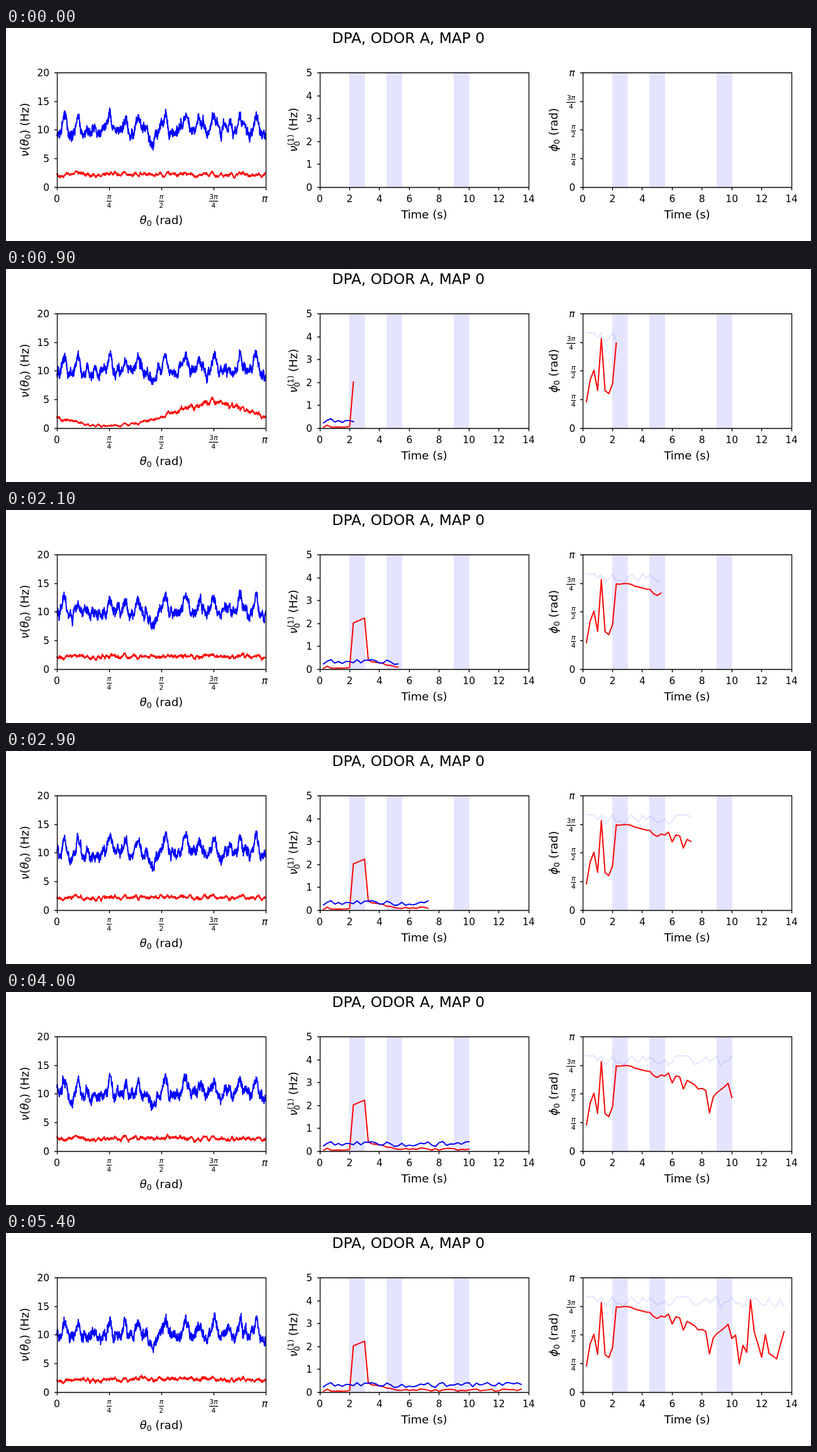
These frames come from a looping animation (1280x340 px, 5.5 s). An HTML page:

```html
<!DOCTYPE html>
<html lang="en">
<head>
<meta charset="utf-8">
<title>Tuning curves</title>
<style>
  html, body { margin: 0; width: 100%; height: 100%; overflow: hidden; background: #fff; }
  svg { display: block; font-family: "DejaVu Sans", sans-serif; }
  text { text-anchor: middle; font-size: 15.4px; }
  .title { font-size: 23.3px; }
  .label { font-size: 18px; }
  .small { font-size: 12.6px; }
  .frac { font-size: 10.8px; }
  .it { font-style: italic; }
  .end { text-anchor: end; }
  .line { fill: none; stroke-width: 1.95; stroke-linejoin: round; stroke-linecap: square; }
  .axis { fill: none; stroke: #000; stroke-width: 1.3; }
  .band { fill: #00f; stroke: #00f; stroke-width: 1.2; opacity: .1; }
</style>
</head>
<body>
<svg id="stage" width="1280" height="340"></svg>
<script>
const TOP = 71.5, BOTTOM = 254, WIDTH = 332, HEIGHT = BOTTOM - TOP;
const STEP_MS = 100, STEPS = 55, DT = 0.25, DURATION = 14, CELLS = 1000;
const LEFT = { tuning: 81, rate: 499, phase: 917 };

// Seeded uniform noise in -1..1
function random(seed) {
  let a = seed * 7919 + 17;
  return () => {
    a = a + 0x6D2B79F5 | 0;
    let t = Math.imul(a ^ a >>> 15, 1 | a);
    t = t + Math.imul(t ^ t >>> 7, 61 | t) ^ t;
    return ((t ^ t >>> 14) >>> 0) / 2147483648 - 1;
  };
}

// Moving average of white noise, scaled to unit deviation
function smoothNoise(seed, span) {
  const white = Array.from({ length: CELLS + span }, random(seed));
  let sum = 0;
  for (let i = 0; i < span; i++) sum += white[i];
  return Array.from({ length: CELLS }, (_, i) => {
    sum += white[i + span] - white[i];
    return sum * Math.sqrt(3 / span);
  });
}

function interpolate(keys, x) {
  const i = Math.max(1, keys.findIndex(k => k[0] >= x));
  const [x0, y0] = keys[i - 1], [x1, y1] = keys[i];
  return y0 + (y1 - y0) * (x - x0) / (x1 - x0);
}

// Turning points of the red phase: [step, degrees]
const phaseKeys = [[1, 41], [2, 75], [3, 92], [4, 59], [5, 142], [6, 59], [7, 54], [8, 70], [9, 134], [12, 134],
  [18, 125], [33, 96], [34, 61], [35, 86], [39, 107], [40, 84], [41, 90], [42, 45], [43, 74], [44, 62],
  [45, 146], [46, 95], [48, 55], [49, 90], [50, 60], [52, 53], [54, 95]];

// A trace has one value per step, starting at step 1
const trace = (seed, rule) => {
  const noise = random(seed);
  return Array.from({ length: STEPS - 1 }, (_, i) => rule(i + 1, noise()));
};
const rateRed = trace(1, (n, noise) =>
  n >= 9 && n <= 12 ? 2.02 + .07 * (n - 9) : .085 + .05 * noise + (n > 12 ? .34 * Math.exp((13 - n) / 4) : 0));
const rateBlue = trace(2, (n, noise) => .31 + .11 * noise);
const phaseRed = trace(3, (n, noise) => interpolate(phaseKeys, n) + (n > 18 && n < 33 ? 10 : 1) * noise);
const phaseBlue = trace(4, (n, noise) => 142 + 9 * noise);

const stage = document.getElementById("stage");
const text = (x, y, s, cls = "", more = "") => `<text x="${x}" y="${y}" class="${cls}" ${more}>${s}</text>`;
const path = d => `<path class="axis" d="${d}"/>`;
const sub = (s, after) => `<tspan class="small" dy="3">${s}</tspan><tspan dy="-3">${after}</tspan>`;
const it = s => `<tspan class="it">${s}</tspan>`;
const vertical = (x, s, y = 162.5, cls = "label") =>
  text(0, 0, s, cls, `transform="translate(${x} ${y}) rotate(-90)"`);

function fraction(x, y, num, den) {
  const half = num.length * 3.4 + .4;
  return text(x, y - 3.3, num.replace("π", it("π")), "frac") + text(x, y + 10, den, "frac") +
    path(`M${x - half} ${y}h${half * 2}`);
}

// Spines and ticks sit on whole pixels
function frame(left, xTicks, yTicks) {
  const snap = v => Math.floor(v) + .5, bottom = snap(BOTTOM);
  let d = `M${snap(left)} ${snap(TOP)}h${WIDTH}V${bottom}h${-WIDTH}z`;
  for (let i = 0; i <= xTicks; i++) d += `M${snap(left + WIDTH * i / xTicks)} ${bottom}v4.5`;
  for (let i = 0; i <= yTicks; i++) d += `M${snap(left)} ${snap(BOTTOM - HEIGHT * i / yTicks)}h-4.5`;
  return path(d);
}

function build() {
  const { tuning, rate, phase } = LEFT;
  let under = "", over = text(639.7, 24, "DPA, ODOR A, MAP 0", "title");
  for (const left of [rate, phase]) {
    for (const [from, to] of [[2, 3], [4.5, 5.5], [9, 10]]) {
      const x = left + WIDTH * from / DURATION, w = WIDTH * (to - from) / DURATION;
      under += `<rect class="band" x="${x}" y="${TOP}" width="${w}" height="${HEIGHT}"/>`;
    }
    for (let s = 0; s <= DURATION; s += 2) over += text(left + WIDTH * s / DURATION, 277.5, s);
    over += text(left + WIDTH / 2, 303.5, "Time (s)", "label");
  }
  for (const [left, max, step] of [[tuning, 20, 5], [rate, 5, 1]])
    for (let v = 0; v <= max; v += step)
      over += text(left - 12, BOTTOM - HEIGHT * v / max + 5.7, v, "end");
  over += text(tuning, 277.5, "0") + text(phase - 16.5, 259.7, "0");
  over += text(411.5, 277.5, "π", "it") + text(phase - 17, 77, "π", "it");
  [["π", "4"], ["π", "2"], ["3π", "4"]].forEach(([num, den], i) => {
    const k = (i + 1) / 4;
    over += fraction(tuning + WIDTH * k, 276.5, num, den);
    over += fraction(phase - 11 - num.length * 3.8, BOTTOM - HEIGHT * k + 1.5, num, den);
  });
  over += text(247, 313, it("θ") + sub(0, " (rad)"), "label");
  over += vertical(36, it("ν") + "(" + it("θ") + sub(0, ") (Hz)"));
  over += vertical(463, it("ν") + '<tspan class="small" dy="-6.5">(1)</tspan><tspan dy="6.5"> (Hz)</tspan>');
  over += vertical(466.5, "0", 184.5, "small");
  over += vertical(877, it("ϕ") + sub(0, " (rad)"));
  over += frame(tuning, 4, 4) + frame(rate, 7, 5) + frame(phase, 7, 4);

  const curve = (id, color, opacity = 1) =>
    `<path id="${id}" class="line" stroke="${color}" opacity="${opacity}"/>`;
  stage.innerHTML = under + curve("tuneRed", "red") + curve("tuneBlue", "blue") +
    curve("rateR", "red") + curve("rateB", "blue") +
    curve("phaseR", "red") + curve("phaseB", "blue", .1) + over;
}

// Steady profiles that every step shares
const cells = Array.from({ length: CELLS }, (_, i) => LEFT.tuning + WIDTH * i / (CELLS - 1));
const bump = (x, center, width) => Math.exp(-(((x - center) / width) ** 2));
const peaks = [93, 115, 165, 190, 211, 253, 285, 308, 331, 372, 397];
const blueNoise = smoothNoise(500, 16), redNoise = smoothNoise(501, 14);
const blueBase = cells.map((x, i) => 9.9 + .4 * blueNoise[i] - 1.5 * bump(x, 233, 7) +
  peaks.reduce((sum, p) => sum + 2.5 * bump(x, p, 4.5), 0));

const setPath = (id, points) => document.getElementById(id).setAttribute("d",
  points.length > 1 ? "M" + points.map(([x, y]) => x.toFixed(2) + " " + y.toFixed(2)).join("L") : "");

function drawTuning(step) {
  const blue = smoothNoise(step + 1, 10), red = smoothNoise(step + 101, 12), jitter = random(step + 201);
  const r = step ? rateRed[step - 1] : .05;
  const phi = (step ? phaseRed[step - 1] : 60) * Math.PI / 180;
  const toY = hz => BOTTOM - HEIGHT * hz / 20;
  setPath("tuneBlue", cells.map((x, i) => [x, toY(blueBase[i] + .45 * blue[i] + .65 * jitter())]));
  setPath("tuneRed", cells.map((x, i) => {
    const angle = 2 * (Math.PI * i / CELLS - phi);
    const mean = 2.2 + r * Math.cos(angle) + .06 * r * r * Math.cos(2 * angle);
    const noise = .16 * redNoise[i] + .12 * red[i] + .14 * jitter();
    return [x, toY(mean + noise * Math.sqrt(mean / 2.2))];
  }));
}

function drawTrace(id, left, values, max, step) {
  setPath(id, values.slice(0, step).map((v, i) =>
    [left + WIDTH * DT * (i + 1) / DURATION, BOTTOM - HEIGHT * v / max]));
}

let shown = -1;
function tick() {
  const step = Math.floor(performance.now() / STEP_MS) % STEPS;
  if (step !== shown) {
    shown = step;
    drawTuning(step);
    drawTrace("rateR", LEFT.rate, rateRed, 5, step);
    drawTrace("rateB", LEFT.rate, rateBlue, 5, step);
    drawTrace("phaseR", LEFT.phase, phaseRed, 180, step);
    drawTrace("phaseB", LEFT.phase, phaseBlue, 180, step);
  }
  requestAnimationFrame(tick);
}

build();
tick();
</script>
</body>
</html>
```
